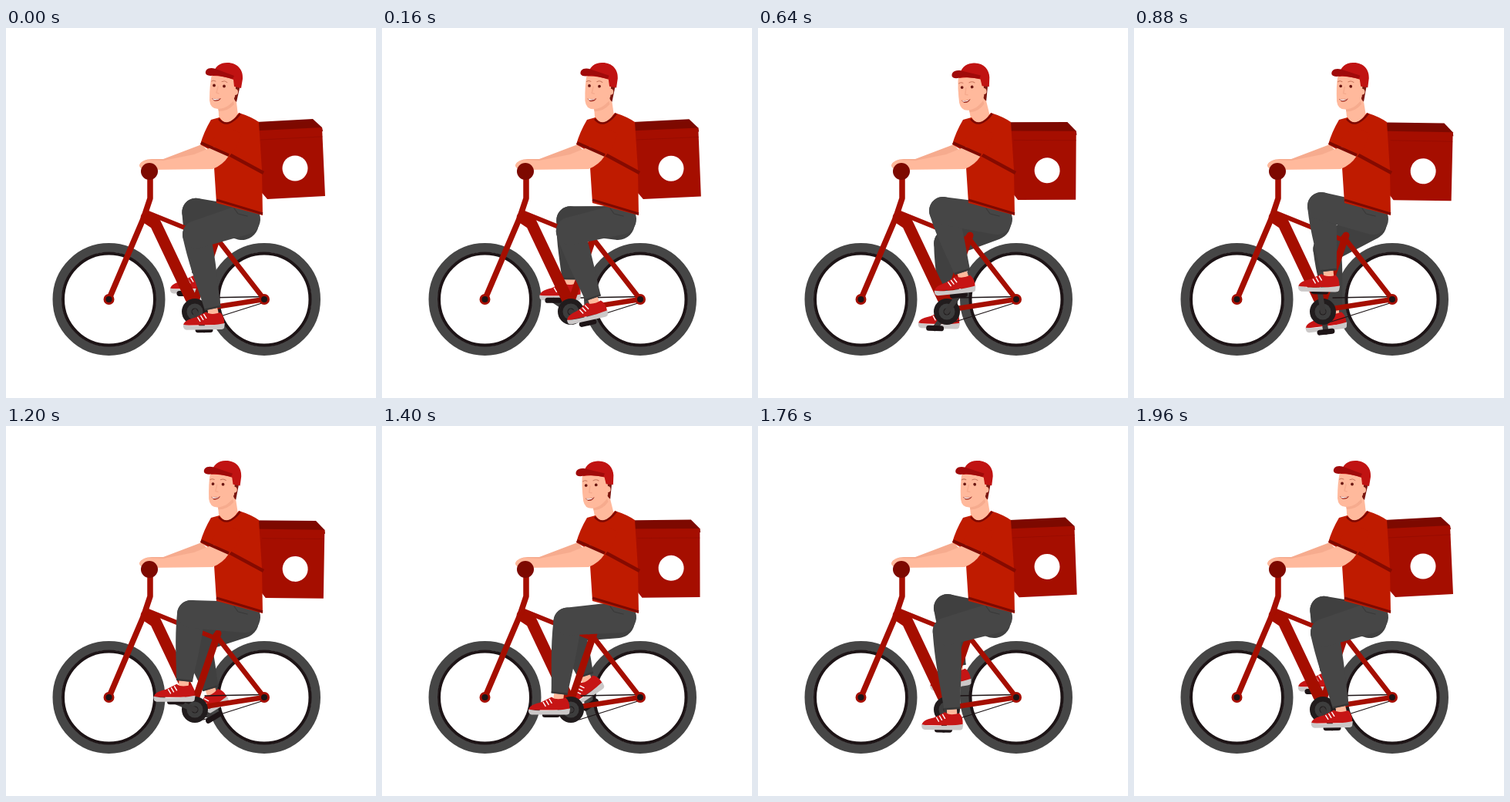
An HTML page with a canvas that plays this animation: 480x480 px, repeating every 2000 ms.

```html
<!DOCTYPE html>
<html lang="en">
<head>
<meta charset="utf-8">
<title>Courier on a bicycle</title>
<style>
  html, body { margin: 0; width: 100%; height: 100%; overflow: hidden; background: #fff; }
  canvas { display: block; width: 480px; height: 480px; }
</style>
</head>
<body>
<canvas id="stage" width="480" height="480"></canvas>
<script>
const ctx = document.getElementById('stage').getContext('2d');
const TAU = Math.PI * 2;
const STEP = 40, STEPS = 50;

const RED = '#a50e00', SHIRT = '#bf1b00', DARK_RED = '#7d0900', SHOE = '#c61515';
const PANTS = '#464646', FAR_PANTS = '#404040', BLACK = '#1d1416', TYRE = '#464646';
const SKIN = '#ffb99c', SKIN_SHADE = '#f6ab8e';
const CRANK = { x: 245, y: 368, r: 26.5 };

// Pedal stroke: phase, knee x, knee y, near foot tilt, far foot tilt, foot shift
const STROKE = [
  [0,     247, 268, -1,  -12, 0],
  [0.163, 240, 256, -22, -36, 1],
  [0.327, 240, 237, -6,  -19, -4],
  [0.449, 243, 231, 1,   -3,  -1],
  [0.612, 240, 244, 0,   0,   -2],
  [0.816, 242, 262, 0,   2,   -2]
];
const NOD = [0, 580, 1070, 1450, 1960];

const rad = deg => deg * Math.PI / 180;

function knot(i) {
  const n = STROKE.length, k = ((i % n) + n) % n;
  return [STROKE[k][0] + Math.floor(i / n), ...STROKE[k].slice(1)];
}

// Smooth periodic interpolation of one column
function stroke(phase, col) {
  const t = ((phase % 1) + 1) % 1;
  let i = STROKE.length - 1;
  while (STROKE[i][0] > t) i--;
  const [a, b, c, d] = [-1, 0, 1, 2].map(k => knot(i + k));
  const span = c[0] - b[0], u = (t - b[0]) / span;
  const mb = (c[col] - a[col]) / (c[0] - a[0]) * span;
  const mc = (d[col] - b[col]) / (d[0] - b[0]) * span;
  const u2 = u * u, u3 = u2 * u;
  return (2 * u3 - 3 * u2 + 1) * b[col] + (u3 - 2 * u2 + u) * mb
       + (3 * u2 - 2 * u3) * c[col] + (u3 - u2) * mc;
}

function nodAmount(ms) {
  let i = 0;
  while (i < NOD.length - 2 && ms >= NOD[i + 1]) i++;
  const u = (ms - NOD[i]) / (NOD[i + 1] - NOD[i]);
  const ease = (1 - Math.cos(Math.PI * u)) / 2;
  return i % 2 ? 1 - ease : ease;
}

function fill(d, color) {
  ctx.fillStyle = color;
  ctx.fill(new Path2D(d));
}

function line(d, color, width, cap = 'round') {
  ctx.strokeStyle = color;
  ctx.lineWidth = width;
  ctx.lineCap = cap;
  ctx.lineJoin = 'round';
  ctx.stroke(new Path2D(d));
}

function disc(x, y, r, color) {
  ctx.fillStyle = color;
  ctx.beginPath();
  ctx.arc(x, y, r, 0, TAU);
  ctx.fill();
}

function posed(x, y, deg, draw) {
  ctx.save();
  ctx.translate(x, y);
  ctx.rotate(rad(deg));
  draw();
  ctx.restore();
}

function pivoted(x, y, deg, draw) {
  posed(x, y, deg, () => { ctx.translate(-x, -y); draw(); });
}

// Two round ends joined by their common tangents
function limb(a, ra, b, rb, color) {
  const dir = Math.atan2(b.y - a.y, b.x - a.x);
  const spread = Math.acos((ra - rb) / Math.hypot(b.x - a.x, b.y - a.y));
  ctx.fillStyle = color;
  ctx.beginPath();
  ctx.arc(a.x, a.y, ra, dir + spread, dir - spread + TAU);
  ctx.arc(b.x, b.y, rb, dir - spread, dir + spread);
  ctx.fill();
}

function shin(knee, ankle, color, cuff) {
  const len = Math.hypot(ankle.x - knee.x, ankle.y - knee.y);
  const dir = Math.atan2(ankle.y - knee.y, ankle.x - knee.x) * 180 / Math.PI;
  posed(knee.x, knee.y, dir - 90, () => {
    line(`M0 ${len - 8}V${len + 4}`, SKIN, 13, 'butt');
    const end = len - 4;
    fill(`M-18 0A18 18 0 0 1 18 0C18 ${len * 0.4} 13 ${len * 0.7} 11 ${end}H-10C-12 ${len * 0.7} -18 ${len * 0.4} -18 0Z`, color);
    line(`M-10 ${end - 1}H11`, cuff, 2.5, 'butt');
  });
}

function wheel(x) {
  const ring = (r, w, color) => {
    ctx.strokeStyle = color;
    ctx.lineWidth = w;
    ctx.beginPath();
    ctx.arc(x, 352, r, 0, TAU);
    ctx.stroke();
  };
  ring(67, 12, TYRE);
  ring(59.5, 4, BLACK);
}

function hub(x) {
  disc(x, 352, 7, RED);
  disc(x, 352, 4, BLACK);
}

function pedal(pos, tilt) {
  line(`M${CRANK.x} ${CRANK.y}L${pos.x} ${pos.y}`, '#3c3a3a', 7);
  posed(pos.x, pos.y, tilt, () => line('M-8 0H8', BLACK, 7));
}

function shoe(pos, tilt) {
  posed(pos.x, pos.y, tilt, () => {
    fill('M-27 -6C-26 -12 -19 -14 -11 -16L3 -23C7 -19 16 -20 21 -22C25 -19 27 -13 26 -6Z', SHOE);
    fill('M-27 -7C-16 -4 10 -5 27 -8L26 -2Q25 0 21 0H-23Q-28 -1 -27 -7Z', '#cbc8c8');
    line('M-8 -16L-5 -11M-4 -18L-1 -13M0 -20L3 -15', '#fff', 1.4);
  });
}

function leg(phase, near) {
  const turn = rad(27) + phase * TAU;
  const slide = near ? 0 : 4 + 7 * Math.cos((phase - 0.65) * TAU);
  const tilt = stroke(phase, near ? 3 : 4);
  const foot = {
    x: CRANK.x + CRANK.r * Math.sin(turn),
    y: CRANK.y + CRANK.r * Math.cos(turn)
  };
  // The foot tips around its ball
  const a = rad(tilt);
  const sole = { x: foot.x + slide + stroke(phase, 5), y: foot.y + 14 * Math.sin(a) };
  const ankle = {
    x: sole.x + 12 * Math.cos(a) + 23 * Math.sin(a),
    y: sole.y + 12 * Math.sin(a) - 23 * Math.cos(a)
  };
  const knee = { x: stroke(phase, 1), y: stroke(phase, 2) };
  if (!near) {
    knee.x += 4;
    knee.y = 235 + (knee.y - 231) * 1.4;
  }
  const hip = near ? { x: 310, y: 248 } : { x: 306, y: 253 };
  const color = near ? PANTS : FAR_PANTS;

  if (near) pedal(foot, tilt);
  shin(knee, ankle, color, '#383838');
  limb(hip, near ? 20 : 22, knee, 18, color);
  shoe(sole, tilt);
  if (!near) pedal(foot, tilt);
}

function bikeFrame() {
  line('M258 350L335 348.5M256 381L335 356', BLACK, 1.3);
  line('M245 366L335 352', RED, 6.5);
  line('M272 271L335 352', RED, 6.5);
  line('M275 269L246 354', RED, 9);
  line('M182 239L276 277', RED, 6);
  line('M182 246L194 254L240 351', RED, 15);
  line('M133.5 352L180 243', RED, 7.5);
  line('M180 242L187 221V190', RED, 7.5);
  hub(133.5);
  hub(335);
}

function chainring() {
  disc(CRANK.x, CRANK.y, 17, '#211c1d');
  disc(CRANK.x, CRANK.y, 10.5, '#3d3d3d');
  disc(CRANK.x, CRANK.y, 4.5, '#211c1d');
  disc(CRANK.x + 1, CRANK.y, 2.5, '#3d3d3d');
}

function bag() {
  fill('M306 123L398 118L410 129L411 134L306 140Z', DARK_RED);
  fill('M310 134L410 129L414 218L339 222L333 215L310 190Z', RED);
  line('M330 145L410 141', '#980c00', 1);
  disc(375, 182, 16.5, '#fff');
}

function head() {
  fill('M275 96L298 88L303 130L277 130Z', SKIN);
  fill('M275 104Q286 104 295 95L296 99Q288 108 276 108Z', SKIN_SHADE);
  fill('M294 74H304L299 96Q296 94 295 88Z', '#7b1710');
  fill('M267 60L299 66L297 89Q291 104 275 105Q265 105 264 94Q264 74 267 60Z', SKIN);
  disc(297, 83, 4, SKIN);
  fill('M268 61C271 49 278 45 287 45C301 45 308 55 307 66L305 78L296 76L295 67Q282 62 268 62Z', '#c01312');
  fill('M272 53C263 50 258 54 259 59C261 63 268 62 273 61L294 66L296 62Z', '#a00a0a');
  disc(270, 74.5, 1.9, '#6a1712');
  disc(283, 75.5, 1.9, '#6a1712');
  line('M266.5 69Q269 67 272 69M280 69.5Q284 67.5 287 70.5', '#c9785f', 1);
  line('M275 76L273 84L276 85', SKIN_SHADE, 1.5);
  fill('M267 91Q273 93 279 91Q276 96 270 94.5Z', '#9b2419');
  fill('M268 91.3Q273 93 278 91.5Q274 94.5 269 93Z', '#fff');
}

function torso() {
  fill('M254 151L263 161L202 179L184 180Q174 183 173 178Q177 170 189 170L204 170Z', SKIN_SHADE);
  fill('M266 119L277 116Q287 132 302 110Q318 115 328 122L332 184L333 243L273 227L270 181L264 158L252 151Q257 134 266 119Z', SHIRT);
  line('M276 118Q287 132 304 111', DARK_RED, 2.5, 'butt');
  line('M273 223L333 241', DARK_RED, 3, 'butt');
  line('M284 161L334 188', '#850a00', 4.5, 'butt');
  fill('M271 153L244 164L204 172L184 171Q173 173 173 179Q175 185 184 184L268 183Q281 178 289 166Z', SKIN);
  fill('M266 152Q270 135 289 129L306 137Q300 156 289 167Z', SHIRT);
  line('M253 149L289 165', DARK_RED, 4, 'butt');
  disc(186, 186, 11, DARK_RED);
}

function draw(ms) {
  const phase = ms / (STEP * (STEPS - 1));
  ctx.fillStyle = '#fff';
  ctx.fillRect(0, 0, 480, 480);
  wheel(133.5);
  wheel(335);
  leg(phase + 0.5, false);
  bikeFrame();
  chainring();
  leg(phase, true);
  line('M296 234L301 241L313 244', '#393939', 1.2);
  pivoted(320, 186, 2 * (1 - Math.cos(phase * TAU)), bag);
  pivoted(288, 118, -7.5 * nodAmount(ms), head);
  torso();
}

function tick() {
  draw(Math.floor(performance.now() / STEP) % STEPS * STEP);
  requestAnimationFrame(tick);
}
tick();
</script>
</body>
</html>
```
